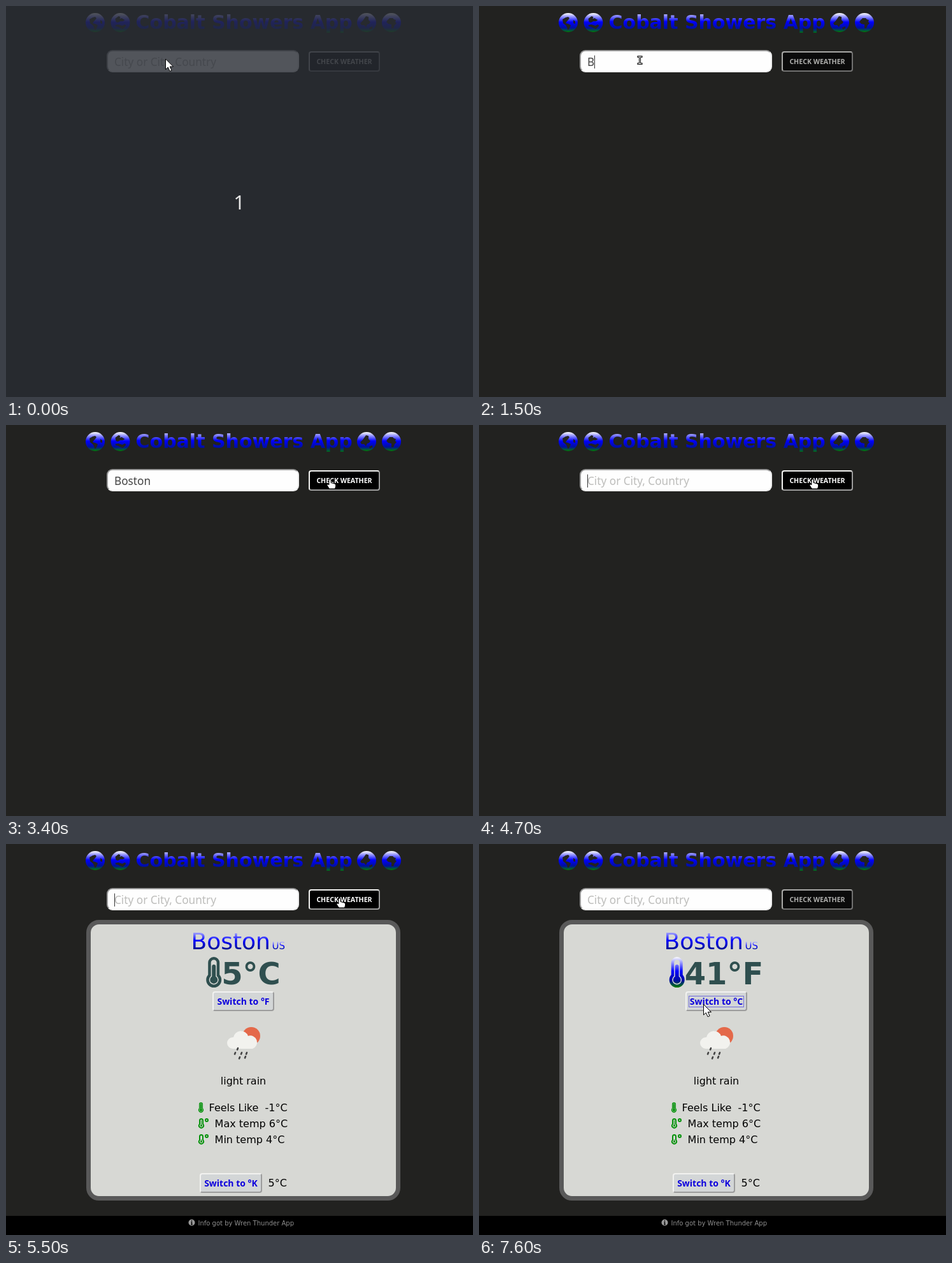
Write an HTML page that moves like this. It is 733 by 613 pixels and loops after 8000 ms.

```html
<!DOCTYPE html>
<html lang="en">
<head>
<meta charset="utf-8">
<title>Weather lookup</title>
<style>
  html, body { margin: 0; width: 733px; height: 613px; overflow: hidden; background: #222220; }
  div { position: absolute; box-sizing: border-box; }
  svg { position: absolute; left: 0; top: 0; }
  text { white-space: pre; font: 16px "DejaVu Sans", sans-serif; }
  .ui { font-family: "Noto Sans", sans-serif; }
  .field { left: 158px; top: 69px; width: 302px; height: 35px; background: #fefefe; border: 2px solid; border-color: #9a9a9a #ececec #ececec #9a9a9a; border-radius: 9px; }
  .bevel { border: 2px solid; border-color: #f2f2f0 #9c9c9c #9c9c9c #f2f2f0; border-radius: 4px; background: #d3d6d7; height: 31px; }
  .bevel.down { border-color: #9c9c9c #f2f2f0 #f2f2f0 #9c9c9c; }
  #check { left: 475px; top: 71px; width: 112px; height: 32px; background: #000; }
  #unit { left: 324px; top: 231px; width: 97px; }
  #kelvin { left: 304px; width: 98px; }
  #card { left: 126px; top: 119px; width: 493px; background: #d7d8d4; border: 7px solid #595959; border-radius: 20px; }
  #foot { left: 0; top: 583px; width: 733px; height: 30px; background: #000; }
  .link { font-size: 14px; font-weight: 700; fill: #0d00dd; text-anchor: middle; }
</style>
</head>
<body>
<div class="field"></div>
<div id="check" class="bevel"></div>
<div id="result">
  <div id="card"></div>
  <div id="unit" class="bevel"></div>
  <div id="kelvin" class="bevel"></div>
  <div id="foot"></div>
</div>
<svg width="733" height="613" viewBox="0 0 733 613">
  <defs>
    <linearGradient id="sky" x2="0" y2="1">
      <stop stop-color="#fff"/>
      <stop offset=".47" stop-color="#00f"/>
      <stop offset=".78" stop-color="#00109b"/>
      <stop offset="1" stop-color="#008000"/>
    </linearGradient>
  </defs>

  <g id="globes" fill="#222220"></g>
  <text x="203.5" y="36" style="font-size:30px;font-weight:700" fill="url(#sky)">Cobalt Showers App</text>

  <text id="entry" class="ui" x="170" y="93.5" style="font-size:17.2px"></text>
  <path id="caret" d="M0 77.5V98" stroke="#333"/>
  <text id="checkText" class="ui" x="531" y="91" text-anchor="middle" style="font-size:10.6px;font-weight:700">CHECK WEATHER</text>

  <g id="report">
    <text x="290.5" y="165" style="font-size:36px" fill="url(#sky)">Boston</text>
    <text x="417.5" y="165" style="font-size:15px" fill="url(#sky)">US</text>
    <path id="bulb" fill-rule="evenodd"/>
    <text id="temp" y="220" style="font-size:48px;font-weight:700" fill="#2f4f4f"></text>
    <text id="unitText" class="ui link" x="372.5" y="252"></text>
    <rect id="focus" x="329.5" y="238.5" width="86" height="17" fill="none" stroke="#0d00dd" stroke-dasharray="1 1"/>

    <g id="rain">
      <circle cx="385" cy="301" r="14" fill="#e4694a"/>
      <path fill="#f2f2ee" d="M356 321a9 9 0 0 1 0-18h1a12 12 0 0 1 23-2a10 10 0 0 1 7 20z"/>
      <path id="drops" stroke="#444" stroke-width="2.6" stroke-linecap="round"/>
    </g>

    <g id="low">
      <text x="372.5" y="277" text-anchor="middle">light rain</text>
      <g id="icons" fill="#06920c" fill-rule="evenodd"></g>
      <text x="318.6" y="319">Feels Like  -1°C</text>
      <text x="327.6" y="344">Max temp 6°C</text>
      <text x="327.6" y="369">Min temp 4°C</text>
      <text class="ui link" x="353" y="437">Switch to °K</text>
      <text x="411.5" y="437">5°C</text>
    </g>

    <circle cx="291.5" cy="593.5" r="5" fill="#999"/>
    <path d="M291.5 590v1.6M290.5 593h1v3.5m-1.2 0h2.4" stroke="#000" stroke-width="1.4" fill="none"/>
    <text x="301.5" y="598" style="font-size:10px" fill="#8f8f8f">Info got by Wren Thunder App</text>
  </g>

  <g id="pause">
    <rect width="733" height="613" fill="rgb(41,44,51)" opacity=".805"/>
    <text class="ui" x="366" y="318.5" text-anchor="middle" style="font-size:31px" fill="#e4e4e4">1</text>
  </g>

  <g id="cursor" stroke-linejoin="round">
    <path id="arrow" fill="#fff" stroke="#000" d="M0 0V16.5L3.8 13 6.6 19.3 9.6 18 6.8 12H12z"/>
    <g id="beam" fill="none" stroke-linecap="square">
      <path stroke="#000" stroke-width="3" d="M-2 -5.5H3M.5 -5.5V5.5M-2 5.5H3"/>
      <path stroke="#fff" d="M-2 -5.5H3M.5 -5.5V5.5M-2 5.5H3"/>
    </g>
    <path id="hand" fill="#fff" stroke="#000" d="M-1.6 1Q0 -1.6 1.6 1V5.5L7.5 7Q9.6 8 9.2 11L8 15H-1L-4.5 9.5Q-4.5 7 -2.6 8L-1.6 9z"/>
  </g>
</svg>
<script>
const LOOP = 8000;
const $ = id => document.getElementById(id);
const show = (id, on) => { $(id).style.display = on ? '' : 'none'; };
const within = (v, a, b) => v >= a && v < b;

// Tube of half-width h joined to a bulb of radius r.
function tube(cx, cy, h, r, top) {
  const y = cy - Math.sqrt(r * r - h * h);
  return `M${cx - h} ${y}V${top}a${h} ${h} 0 0 1 ${2 * h} 0V${y}a${r} ${r} 0 1 1 ${-2 * h} 0z`;
}
const ring = (cx, cy, r) => `M${cx - r} ${cy}a${r} ${r} 0 1 1 ${2 * r} 0a${r} ${r} 0 1 1 ${-2 * r} 0z`;
const thermo = top => tube(128, 384, 96, 128, 96) + tube(128, 384, 48, 80, 96) + tube(128, 384, 32, 64, top);
const degrees = top => tube(144, 368, 112, 144, 112) + tube(144, 368, 48, 80, 112) +
  tube(144, 368, 16, 48, top) + ring(416, 96, 96) + ring(416, 96, 32);

$('bulb').setAttribute('d', thermo(160));
$('icons').innerHTML = [thermo(96), degrees(112), degrees(270)].map((d, i) =>
  `<path transform="translate(302 ${305 + 25 * i}) scale(.03125)" d="${d}"/>`).join('');

$('drops').setAttribute('d', [[364, 320], [360, 327], [370, 327], [378, 327], [367, 334], [376, 333]]
  .map(([x, y]) => `M${x} ${y}l-1 2.4`).join(''));

const lands = [
  [140, 'M-9 -5L-4 -8 0 -9 2 -7 0 -4 -2 -2 -4 1 0 2 4 4 3 7 1 11 -1 11 -2 7 -4 4 -8 1zM8 -4L11 -2 11 2 8 1z'],
  [179.5, 'M-8 -6L-3 -10 0 -9 -1 -6 2 -7 7 -4 4 -2 0 -2 -4 0 -7 -1zM-8 4L-3 3 3 5 7 3 9 5 4 10 1 9 -3 7 -7 6z'],
  [566, 'M-10 1L-6 -3 -1 -10 3 -9 3 -4 6 -1 4 2 1 3 -1 7 -4 4 -8 4zM4 8L9 6 9 9 5 11z'],
  [605, 'M-6 -4L-3 -7 2 -7 4 -5 7 -4 6 -1 8 1 5 4 3 9 0 9 0 3 -5 2 -8 -1z']
];
$('globes').innerHTML = lands.map(([x, d]) =>
  `<g transform="translate(${x} 26)"><circle r="15" fill="url(#sky)"/><path d="${d}"/></g>`).join('');

// Pointer moves: start, number of 100 ms steps, from, to.
const moves = [
  [2900, 7, [252, 85], [523.5, 85]],
  [6400, 6, [523.5, 85], [352.5, 251.5]]
];
function pointer(t) {
  if (t < 500) return [250.5, 83];
  const [start, n, a, b] = moves[t < 6400 ? 0 : 1];
  const k = Math.max(0, Math.min(n, Math.floor((t - start) / 100) + 1)) / n;
  const e = k * k * (3 - 2 * k);
  return a.map((v, i) => v + (b[i] - v) * e);
}

function typed(t) {
  if (!within(t, 1500, 4700)) return '';
  return 'Boston'.slice(0, Math.floor((t - 1500) / 200) + 1);
}

function draw(t) {
  show('pause', t < 500);

  const word = typed(t), entry = $('entry');
  entry.textContent = word || 'City or City, Country';
  entry.setAttribute('fill', word ? '#444' : '#bdbdbb');
  show('caret', within(t, 600, 2900) || within(t, 4100, 5900) || within(t, 7100, 7400));
  const end = word ? Math.round(entry.getComputedTextLength()) : 0;
  $('caret').setAttribute('transform', `translate(${170.5 + end} 0)`);

  const [x, y] = pointer(t);
  const onCheck = within(x, 475, 587) && within(y, 71, 103);
  const onField = t >= 500 && within(x, 158, 460) && within(y, 69, 104);
  show('hand', onCheck);
  show('beam', onField);
  show('arrow', !onCheck && !onField);
  $('cursor').setAttribute('transform', `translate(${x} ${y})`);
  $('check').style.opacity = onCheck ? 1 : .65;
  $('checkText').setAttribute('fill', onCheck ? '#fff' : '#adadab');

  show('result', t >= 5300);
  show('report', t >= 5300);
  const drop = t >= 5500 ? 100 : 0;
  show('rain', drop);
  $('card').style.height = 340 + drop + 'px';
  $('kelvin').style.top = 416 + drop + 'px';
  $('low').setAttribute('transform', `translate(0 ${drop})`);

  const hot = t >= 7600, left = hot ? 298.7 : 314.2;
  $('bulb').setAttribute('transform', `translate(${left} 177) scale(.09375)`);
  $('bulb').setAttribute('fill', hot ? 'url(#sky)' : '#2f4f4f');
  $('temp').setAttribute('x', left + 24);
  $('temp').textContent = hot ? '41°F' : '5°C';
  $('unitText').textContent = hot ? 'Switch to °C' : 'Switch to °F';
  $('unit').classList.toggle('down', within(t, 7400, 7600));
  show('focus', t >= 7400);
}

const began = performance.now();
function tick() {
  draw((performance.now() - began) % LOOP);
  requestAnimationFrame(tick);
}
tick();
</script>
</body>
</html>
```
